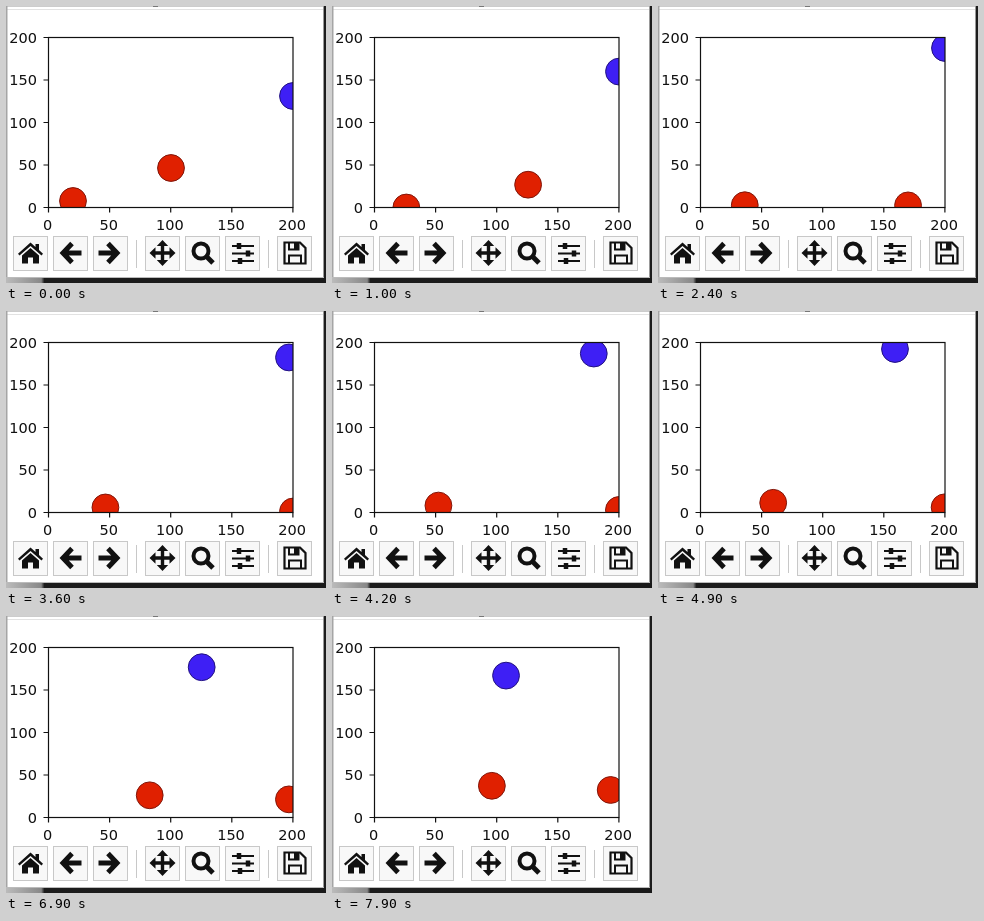
Animation, 320 px wide and 277 px high, one loop 8000 ms. Source, as an HTML page:

```html
<!DOCTYPE html>
<html lang="en">
<head>
<meta charset="utf-8">
<title>Bouncing balls plot</title>
<style>
  html, body { margin: 0; width: 100%; height: 100%; overflow: hidden; background: #fff; }
  svg { display: block; width: 320px; height: 277px; }
  text { font: 14.5px "DejaVu Sans", sans-serif; fill: #111; }
</style>
</head>
<body>
<svg viewBox="0 0 320 277">
  <defs>
    <clipPath id="area"><rect x="42.5" y="31.5" width="244.5" height="170"/></clipPath>
    <linearGradient id="shade">
      <stop offset="0" stop-color="#bbb"/><stop offset=".11" stop-color="#888"/>
      <stop offset=".12" stop-color="#1c1c1c"/><stop offset="1" stop-color="#191919"/>
    </linearGradient>
  </defs>

  <!-- window -->
  <rect width="320" height="277" fill="#fff"/>
  <path d="M0 .5h318" stroke="#ccc"/>
  <path d="M0 3.500h318" stroke="#e2e2e2"/>
  <path d="M147 .5h5" stroke="#777"/>
  <path d="M.75 0v277" stroke="#a5a5a5" stroke-width="1.500"/>
  <rect x="317" width="1" height="272" fill="#999"/>
  <rect x="318" width="2" height="277" fill="#1c1c1c"/>
  <rect y="271" width="318" height="1" fill="#bbb"/>
  <rect y="272" width="320" height="5" fill="url(#shade)"/>

  <g id="balls" clip-path="url(#area)"></g>
  <g id="axes" stroke="#111" stroke-width="1.2" fill="none">
    <rect x="42.5" y="31.5" width="244.5" height="170"/>
  </g>
  <g id="labels"></g>

  <!-- toolbar -->
  <g id="buttons" fill="#f8f8f8" stroke="#c8c8c8"></g>
  <path d="M130.5 234v28M262.5 234v28" stroke="#c8c8c8"/>
  <g fill="#111">
    <path d="M24.5 236.5l5 4.500v-3h3.500v6l4 3.700-1.500 1.800-11-9.500-11 9.500-1.500-1.800z"/>
    <path d="M24.5 242l8.500 7.500v8h-6v-6h-5v6h-6v-8z"/>
  </g>
  <g fill="none" stroke="#111" stroke-width="5">
    <path id="arrow" d="M66 237.5l-9 9.500 9 9.500M57 247h18.500"/>
    <use href="#arrow" transform="matrix(-1 0 0 1 168 0)"/>
  </g>
  <g id="arms" fill="#111"></g>
  <g fill="none" stroke="#111">
    <circle cx="195" cy="245" r="7.5" stroke-width="4"/>
    <path d="M200.5 250.5l6.500 6.500" stroke-width="5"/>
    <path d="M226 240h22M226 247.5h22M226 255h22" stroke-width="2.2"/>
    <path d="M233 237v6M242 244.5v6M234 252v6" stroke-width="4.5"/>
    <path d="M278.5 236.5h15.5l5.5 5.5v15.5h-21z" stroke-width="2.200"/>
    <path d="M283 257v-7.5h12v7.5M283 237v6.5h9.5V237" stroke-width="2"/>
  </g>
  <rect x="288" y="237" width="4" height="6" fill="#111"/>
</svg>
<script>
const NS = "http://www.w3.org/2000/svg";
const LOOP = 8000, STEP = 100;
const HOLDS = [900, 4400, 5000, 7000];
const LEFT = 42.5, RIGHT = 287, FLOOR = 201.5;

function add(parent, tag, attrs, text) {
  const el = document.createElementNS(NS, tag);
  for (const k in attrs) el.setAttribute(k, attrs[k]);
  if (text !== undefined) el.textContent = text;
  document.getElementById(parent).append(el);
  return el;
}

for (let i = 0; i < 5; i++) {
  const x = LEFT + i * 61.1, y = FLOOR - i * 42.5;
  add("axes", "path", { d: `M${x} ${FLOOR}v5M${LEFT} ${y}h-5` });
  add("labels", "text", { x: x - 0.8, y: 223.5, "text-anchor": "middle" }, i * 50);
  add("labels", "text", { x: 31, y: y + 5.2, "text-anchor": "end" }, i * 50);
}

for (const x of [7, 47, 87, 139, 179, 219, 271])
  add("buttons", "rect", { x: x + 0.5, y: 230.5, width: 34, height: 34 });

for (let turn = 0; turn < 360; turn += 90)
  add("arms", "path", {
    d: "M-1.7 0v-7h-4l5.7-6 5.7 6h-4v7z",
    transform: `translate(156.5 247) rotate(${turn})`
  });

// Each path gives [x, y] for s seconds.
function lowRed(s) {
  const u = s - 1;
  return [
    67 + 6.7 * s + 0.64 * s * s,
    u < 0 ? FLOOR + 6.5 * u : FLOOR - 1.5 * u - 0.065 * u ** 3
  ];
}

function fastRed(s) {
  const wall = s - 3.2, floor = s - 2.6;
  return [
    wall < 0 ? 165 + 28 * s + 3.1 * s * s : RIGHT - 0.08 * wall ** 3,
    floor < 0 ? 162 + 17.5 * s - 0.8 * s * s : FLOOR - 0.98 * floor * floor
  ];
}

function blue(s) {
  const u = s - 4.9;
  if (u >= 0) return [237 - 20 * u - 0.33 * u * u, 38 + 5.4 * u + 0.6 * u * u];
  const x = Math.min(RIGHT, 237 - 35.4 * u);
  if (s < 2.4) return [x, 90 - 27.5 * s + 3.1 * s * s];
  return [x, s < 3.6 ? 42 + 3.75 * (s - 2.4) : 38 - 6.5 * u];
}

function ball(path, fill, edge) {
  const el = add("balls", "circle", { r: 13.4, fill, stroke: edge, "stroke-width": 1 });
  return { path, el };
}

const balls = [
  ball(lowRed, "#e02000", "#80160a"),
  ball(fastRed, "#e02000", "#80160a"),
  ball(blue, "#3e1ff5", "#22127f")
];

function draw(now) {
  let t = Math.floor((now % LOOP) / STEP) * STEP;
  if (HOLDS.includes(t)) t -= STEP;
  for (const { path, el } of balls) {
    const [x, y] = path(t / 1000);
    el.setAttribute("cx", x);
    el.setAttribute("cy", y);
  }
}

const start = performance.now();
function tick() {
  draw(performance.now() - start);
  requestAnimationFrame(tick);
}
tick();
</script>
</body>
</html>
```
